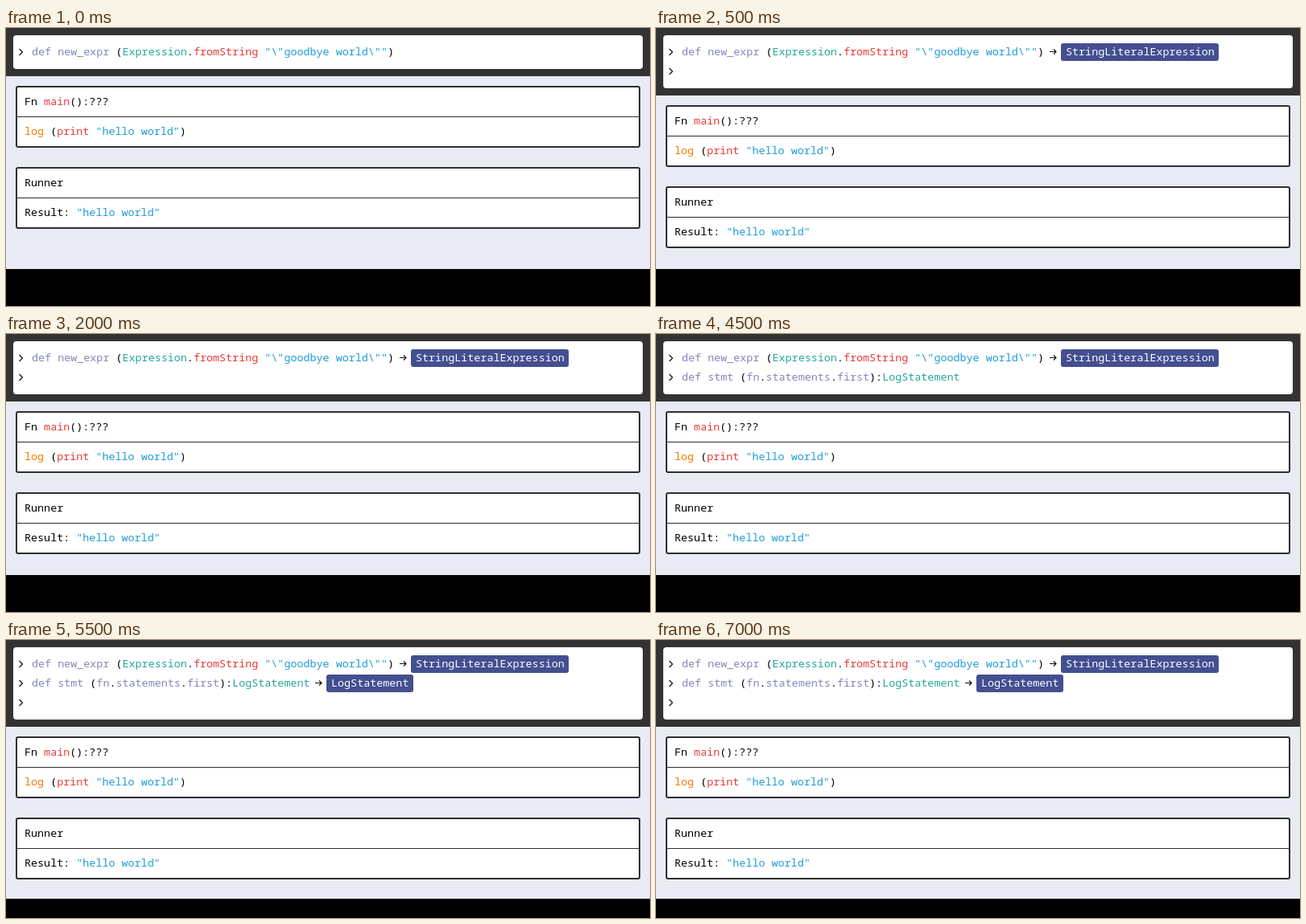
These frames come from a looping animation (800 by 346 pixels, 8000 ms). An HTML page:

```html
<!DOCTYPE html>
<html lang="en">
<head>
<meta charset="utf-8">
<title>Live console</title>
<style>
  html, body { margin: 0; height: 100%; overflow: hidden; background: #000; }
  svg { display: block; }
  text { font: 300 13.4px "Noto Sans Mono", "DejaVu Sans Mono", monospace; white-space: pre; fill: #000; }
  .name { fill: #8585bd; }
  .type { fill: #26a69a; }
  .call { fill: #e53935; }
  .str { fill: #1e9bd7; }
  .log { fill: #ef7d00; }
  .pill rect { fill: #434f91; }
  .pill text { fill: #fff; }
  .mark { fill: none; stroke: #111; stroke-width: 1.2; }
  .card rect { fill: #fff; stroke: #2f2f33; stroke-width: 2; }
  .card path { stroke: #2f2f33; }
</style>
</head>
<body>
<svg width="800" height="346" viewBox="0 0 800 346">
  <rect id="page" width="800" fill="#e8ebf3"/>
  <rect id="header" width="800" fill="#333"/>
  <rect id="console" x="9" y="9" width="782" rx="4" fill="#fff"/>
  <g id="lines"></g>
  <g id="cards"></g>
</svg>
<script>
const $ = id => document.getElementById(id);
const span = (kind, text) => `<tspan class="${kind}">${text}</tspan>`;
const label = (x, y, text) => `<text x="${x}" y="${y}">${text}</text>`;

const prompt = y => `<path class="mark" d="M16.5 ${y - 8}l4 4-4 4"/>`;

const result = (x, y, width, text) => `
  <path class="mark" d="M${x - 14} ${y - 4.5}h8m-3-3l3 3-3 3"/>
  <g class="pill"><rect x="${x}" y="${y - 15}" width="${width}" height="22" rx="3"/>${label(x + 6, y, text)}</g>`;

const card = (y, title, body) => `
  <g class="card">
    <rect x="13" y="${y + 1}" width="774" height="75" rx="2"/>
    <path d="M14 ${y + 38.5}H786"/>
    ${label(23, y + 24, title)}${label(23, y + 61, body)}
  </g>`;

const newExpr = span("name", "def new_expr") + " (" + span("type", "Expression") + "." +
  span("call", "fromString") + " " + span("str", '"\\"goodbye world\\""') + ")";
const stmt = span("name", "def stmt") + " (" + ["fn", "statements", "first"].map(s => span("name", s)).join(".") +
  "):" + span("type", "LogStatement");
const hello = span("str", '"hello world"');

// Each step appears at its time and stays until the loop restarts.
const steps = [
  [0, prompt(34) + label(32, 34, newExpr)],
  [500, result(503, 34, 196, "StringLiteralExpression") + prompt(58)],
  [3000, label(32, 58, stmt)],
  [5500, result(398, 58, 108, "LogStatement") + prompt(82)]
];

$("lines").innerHTML = steps.map(([, content]) => `<g>${content}</g>`).join("");
$("cards").innerHTML =
  card(72, "Fn " + span("call", "main") + "():???", span("log", "log") + " (" + span("call", "print") + " " + hello + ")") +
  card(173, "Runner", "Result: " + hello);

function draw(now) {
  const time = now % 8000;
  steps.forEach(([start], i) => {
    $("lines").children[i].style.display = time >= start ? "" : "none";
  });
  const shift = time < 500 ? 0 : time < 5500 ? 24 : 48;
  $("page").setAttribute("height", Math.max(300, 274 + shift));
  $("header").setAttribute("height", 60 + shift);
  $("console").setAttribute("height", 42 + shift);
  $("cards").setAttribute("transform", `translate(0 ${shift})`);
  requestAnimationFrame(draw);
}
draw(performance.now());
</script>
</body>
</html>
```
